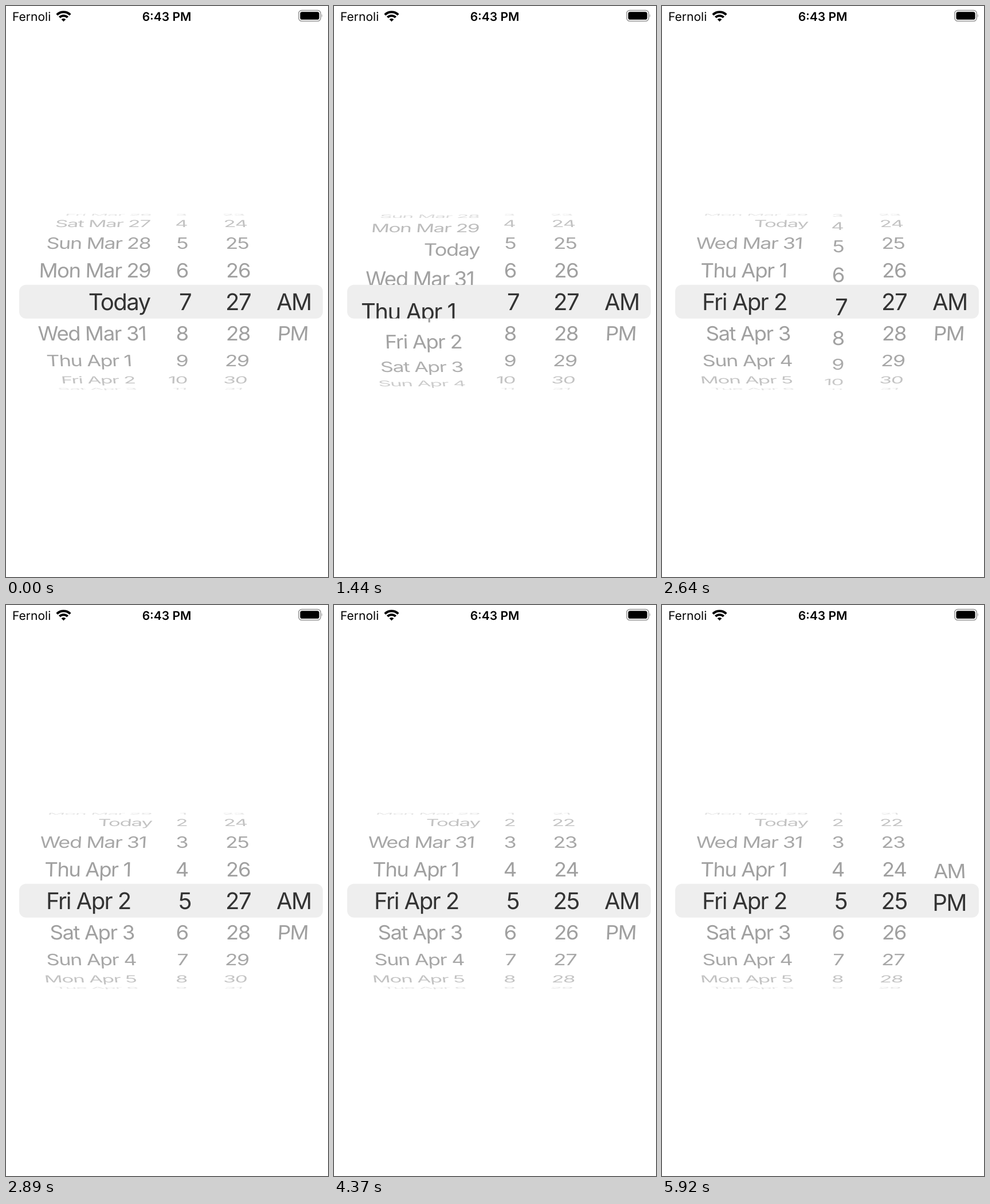
Recreate the animation shown at these times as an HTML page. Size 562 px wide and 997 px high, loop 6000 ms.

```html
<!DOCTYPE html>
<html lang="en">
<head>
<meta charset="utf-8">
<title>Date picker</title>
<style>
  html, body { margin: 0; width: 100%; height: 100%; overflow: hidden; background: #fff; }
  svg { display: block; width: 100%; height: 100%; }
  text {
    font-family: Inter, Roboto, "Liberation Sans", sans-serif;
    font-optical-sizing: none;
    text-rendering: geometricPrecision;
  }
  .status { font-size: 21px; }
  .wheel text { font-size: 36.6px; letter-spacing: -0.04em; }
  .lens { fill: #333; }
</style>
</head>
<body>
<svg viewBox="0 0 562 997" preserveAspectRatio="none">
  <defs>
    <clipPath id="outside">
      <path d="M0 361H562V487H0ZM0 545.5H562V671H0Z"/>
    </clipPath>
    <clipPath id="inside"><rect x="23" y="487" width="530" height="58.5"/></clipPath>
  </defs>

  <text class="status" x="11" y="25.5">Fernoli</text>
  <text class="status" x="280.5" y="25.5" text-anchor="middle" font-weight="600">6:43 PM</text>
  <g fill="none" stroke="#000" stroke-width="4">
    <path d="M88.8 15.3A16.5 16.5 0 0 1 112.2 15.3"/>
    <path d="M93.4 19.9A10 10 0 0 1 107.6 19.9"/>
    <path d="M100.5 27.2L96.6 23.3A5.5 5.5 0 0 1 104.4 23.3Z" fill="#000" stroke="none"/>
  </g>
  <rect x="510.8" y="7.6" width="38.4" height="18.8" rx="5.5" fill="none" stroke="#a2a2a2" stroke-width="1.7"/>
  <rect x="513.4" y="10.2" width="33.2" height="13.6" rx="3.4"/>
  <path d="M550.8 13.8Q553.2 17 550.8 20.2Z" fill="#a2a2a2"/>

  <rect x="23" y="486.7" width="530" height="59" rx="12" fill="#eee"/>
  <g class="wheel" id="rim" clip-path="url(#outside)"></g>
  <g class="wheel lens" id="lens" clip-path="url(#inside)"></g>
</svg>

<script>
const LOOP = 6000;
const MID_X = 281, MID_Y = 516.5;
const RADIUS = 152.5, STEP = 21.2 * Math.PI / 180;
const DEPTH = 0.086, ZOOM = 1.097;
const BASELINE = 13.3;
const FADE = [0.37, 0.37, 0.34, 0.23, 0.11, 0.06];

// Each date label with the centre of its text.
const dates = [
  ['Fri Mar 26', 171], ['Sat Mar 27', 164], ['Sun Mar 28', 159.5], ['Mon Mar 29', 155],
  ['Today', 204.5], ['Wed Mar 31', 150], ['Thu Apr 1', 142.5], ['Fri Apr 2', 155.5],
  ['Sat Apr 3', 150], ['Sun Apr 4', 146.5], ['Mon Apr 5', 141.5], ['Tue Apr 6', 148.5]
];
const range = (from, to, x) =>
  Array.from({ length: to - from + 1 }, (_, i) => [String(from + i), x]);

// pivot: point about which the lens enlarges; first/last/gap: times of the visible steps.
const columns = [
  { rows: dates, pivot: 276, anchor: 'middle', at: 4, move: 3,
    start: 1260, first: 1290, last: 1560, gap: 45 },
  { rows: range(1, 11, 317.8), pivot: 264, anchor: 'end', at: 6, move: -2,
    start: 2590, first: 2640, last: 2890, gap: 50 },
  { rows: range(21, 31, 405), pivot: 404, anchor: 'middle', at: 6, move: -2,
    start: 4070, first: 4100, last: 4370, gap: 45 },
  { rows: [['AM', 501.2], ['PM', 500.5]], pivot: 490, anchor: 'middle', at: 0, move: 1,
    start: 5662, first: 5700, last: 5920, gap: 55 }
];

function addText(parent, label, anchor) {
  const el = document.createElementNS('http://www.w3.org/2000/svg', 'text');
  el.textContent = label;
  el.setAttribute('text-anchor', anchor);
  el.setAttribute('y', BASELINE);
  document.getElementById(parent).append(el);
  return el;
}

for (const col of columns) {
  col.cells = col.rows.map(([label, x]) => ({
    x,
    rim: addText('rim', label, col.anchor),
    lens: addText('lens', label, col.anchor)
  }));
}

function position(col, t) {
  if (t < col.first) return col.at;
  const snapped = Math.min(col.last, col.first + Math.floor((t - col.first) / col.gap) * col.gap);
  const u = Math.min(1, (snapped - col.start) / 300);
  return col.at + col.move * u * u * (3 - 2 * u);
}

function fade(k) {
  const i = Math.min(4, Math.floor(k));
  return FADE[i] + (FADE[i + 1] - FADE[i]) * (k - i);
}

function show(el, visible) {
  el.setAttribute('visibility', visible ? 'visible' : 'hidden');
  return visible;
}

function place(el, ...m) {
  el.setAttribute('transform', `matrix(${m.map(v => v.toFixed(4)).join(' ')})`);
}

function placeCell(cell, k, pivot) {
  const angle = k * STEP;
  const y = RADIUS * Math.sin(angle);

  if (show(cell.rim, Math.abs(k) < 4.24)) {
    const s = 1.006 / (1 + DEPTH * (1 - Math.cos(angle)));
    const dx = cell.x - MID_X;
    const lean = -dx * DEPTH * Math.sin(angle) * s * s / RADIUS;
    place(cell.rim, s, 0, lean, Math.cos(angle * 0.98), MID_X + dx * s, MID_Y + y);
    cell.rim.setAttribute('opacity', fade(Math.abs(k)).toFixed(3));
  }
  if (show(cell.lens, Math.abs(k) < 1.1)) {
    const x = pivot + (cell.x - pivot) * ZOOM;
    place(cell.lens, ZOOM, 0, 0, ZOOM * Math.cos(angle), x, MID_Y + y * ZOOM);
  }
}

function draw(t) {
  for (const col of columns) {
    const pos = position(col, t);
    col.cells.forEach((cell, i) => placeCell(cell, i - pos, col.pivot));
  }
}

const begin = performance.now();
function tick() {
  draw((performance.now() - begin) % LOOP);
  requestAnimationFrame(tick);
}
draw(0);
requestAnimationFrame(tick);
</script>
</body>
</html>
```
